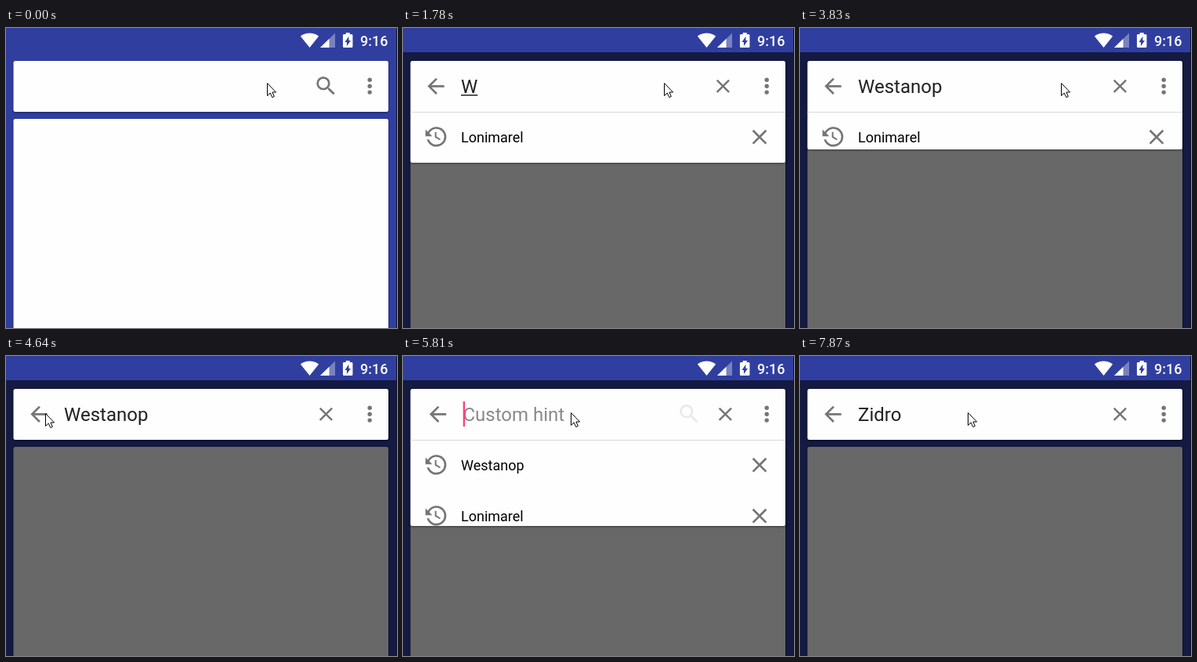
These frames come from a looping animation (499x383 px, 8000 ms). An HTML page:

```html
<!DOCTYPE html>
<html lang="en">
<head>
<meta charset="utf-8">
<title>Floating search bar</title>
<style>
  html, body { margin: 0; width: 100%; height: 100%; overflow: hidden; background: #303f9f; }
  svg { display: block; font-family: Roboto, "Liberation Sans", sans-serif; }
  .shadow { filter: drop-shadow(0 1px 1.5px rgba(0, 0, 0, .45)); }
  .icon { fill: #757575; }
  .query { font-size: 24px; fill: #212121; }
  .hint { font-size: 24px; fill: #8a8a8a; }
  .row { font-size: 18px; }
  .clock { font-size: 18px; font-weight: 500; fill: #fff; }
</style>
</head>
<body>
<svg width="499" height="383" viewBox="0 0 499 383">
  <defs>
    <path id="arrow" d="M20 11H7.83l5.59-5.59L12 4l-8 8 8 8 1.41-1.41L7.83 13H20z"/>
    <path id="cross" d="M19 6.41 17.59 5 12 10.59 6.41 5 5 6.41 10.59 12 5 17.59 6.41 19 12 13.41 17.59 19 19 17.59 13.41 12z"/>
    <path id="lens" d="M15.5 14h-.79l-.28-.27A6.47 6.47 0 0 0 16 9.5 6.5 6.5 0 1 0 9.5 16c1.61 0 3.09-.59 4.23-1.57l.27.28v.79l5 4.99L20.49 19zm-6 0a4.5 4.5 0 1 1 0-9 4.5 4.5 0 0 1 0 9z"/>
    <path id="history" d="M11 7v5.11l4.71 2.79.79-1.28-4-2.37V7M12.5 2C8.97 2 5.91 3.92 4.27 6.77L2 4.5V11h6.5L5.75 8.25C6.96 5.73 9.5 4 12.5 4a7.5 7.5 0 0 1 0 15c-3.27 0-6.03-2.09-7.06-5h-2.1c1.1 4.03 4.77 7 9.16 7a9.5 9.5 0 0 0 0-19z"/>
    <clipPath id="listClip"><rect id="listBox" x="9" y="107" width="479" height="0"/></clipPath>
  </defs>

  <rect width="499" height="383" fill="#303f9f"/>
  <rect class="shadow" x="9.5" y="116" width="478.5" height="290" rx="2.5" fill="#fefefe"/>
  <rect id="dim" y="31" width="499" height="352" opacity="0"/>

  <g fill="#fff">
    <path transform="translate(375.5 3.5)" d="M12 21.5 23.64 7C23.19 6.66 18.71 3 12 3S.81 6.66.36 7z"/>
    <path d="M401 25H420V6.5z" opacity=".35"/>
    <path d="M401 25H412.5V13.8z"/>
    <path transform="translate(421.2 4.1) scale(1.25 .95)" d="M15.67 4H14V2h-4v2H8.33C7.6 4 7 4.6 7 5.33v15.33C7 21.4 7.6 22 8.33 22h7.33c.74 0 1.34-.6 1.34-1.33V5.33C17 4.6 16.4 4 15.67 4zM11 20v-5.5H9L13 7v5.5h2z"/>
  </g>
  <text class="clock" x="452" y="22.5">9:16</text>

  <rect id="panel" class="shadow" x="9.5" y="42" width="478.5" height="65" rx="2.5" fill="#fefefe"/>
  <g id="list" clip-path="url(#listClip)">
    <rect x="9.5" y="107" width="478.5" height="1" fill="#dcdcdc"/>
  </g>

  <g class="icon">
    <use id="back" href="#arrow"/>
    <use id="search" href="#lens"/>
    <use id="clear" href="#cross"/>
    <circle cx="464.2" cy="66.3" r="2.7"/>
    <circle cx="464.2" cy="74.2" r="2.7"/>
    <circle cx="464.2" cy="82.1" r="2.7"/>
  </g>
  <text id="hint" class="hint" y="83">Custom hint</text>
  <text id="query" class="query" y="83"></text>
  <rect id="underline" y="85" height="1.5" fill="#212121"/>
  <rect id="caret" y="58" width="2.4" height="32" fill="#ff4081"/>

  <path id="mouse" d="M.5.5V16.5L4.2 13 6.8 18.6 9.4 17.4 6.9 12H11.6z" fill="#fff" stroke="#000"/>
  <rect x="498" width="1" height="383" fill="#10142e"/>
</svg>

<script>
const LOOP = 8000, ROW = 65, TEXT_X = 74, ICON = 4 / 3;
const $ = id => document.getElementById(id);
const ui = Object.fromEntries(
  ['dim', 'panel', 'list', 'listBox', 'back', 'search', 'clear', 'hint', 'query', 'underline', 'caret', 'mouse']
    .map(id => [id, $(id)]));

// start, end, number of steps
const bursts = [
  [280, 510, 5], [3160, 3960, 14], [4240, 4640, 9], [4920, 5270, 8],
  [5610, 5810, 5], [5810, 5870, 2], [7460, 7870, 9]
];

// time, text, underlined, caret visible
const typing = [
  [0, '', 0, 0], [440, '', 0, 1], [1000, '', 0, 0],
  [1250, 'W', 0, 1], [1310, 'W', 1, 1], [1780, 'W', 1, 0],
  [1940, 'We', 0, 1], [2000, 'We', 1, 1], [2125, 'Wes', 1, 1],
  [2250, 'Wesa', 0, 1], [2310, 'Wesa', 1, 1], [2530, 'Wesa', 0, 1],
  [2800, 'Wes', 1, 1], [2905, 'West', 1, 1], [3010, 'Westa', 1, 1],
  [3160, 'Westan', 1, 1], [3320, 'Westano', 1, 1], [3500, 'Westanop', 1, 1],
  [3640, 'Westanop', 0, 0], [5260, '', 0, 0],
  [5750, '', 0, 1], [6320, '', 0, 0],
  [6650, 'Z', 0, 1], [6770, 'Z', 1, 1], [7080, 'Zi', 1, 1], [7310, 'Zid', 1, 1],
  [7460, 'Zidr', 1, 1], [7510, 'Zidro', 1, 1], [7610, 'Zidro', 0, 0]
];

const clamp = v => Math.min(1, Math.max(0, v));
const linear = (t, a, b) => clamp((t - a) / (b - a));
const ramp = (t, a, b) => .5 - .5 * Math.cos(Math.PI * linear(t, a, b));
const set = (el, attrs) => { for (const k in attrs) el.setAttribute(k, attrs[k]); };
const place = (x, y, s = ICON) => `translate(${x} ${y}) scale(${s}) translate(-12 -12)`;

function hold(t) {
  const burst = bursts.find(([a, b]) => t >= a && t < b);
  if (!burst) return t;
  const [a, b, n] = burst, step = (b - a) / (n - 1);
  return a + Math.floor((t - a) / step + 1e-6) * step;
}

function addRow(i) {
  const y = 139.5 + i * ROW;
  ui.list.insertAdjacentHTML('beforeend',
    `<use class="icon" href="#history" transform="${place(42, y)}"/>
     <text class="row" x="${TEXT_X}" y="${y + 6.5}"></text>
     <use class="icon" href="#cross" transform="${place(455, y - .3)}"/>`);
}
addRow(0);
addRow(1);
const rowTexts = ui.list.querySelectorAll('text');

function mouseAt(t) {
  if (t < 4920) {
    const p = ramp(t, 4190, 4640), q = 1 - p;
    return [333 * q + 50 * p, 70 * q * q + 106 * q * p + 72.5 * p * p];
  }
  return [50 + 164 * ramp(t, 4950, 5270), 72.3];
}

function draw(now) {
  const time = now % LOOP, t = hold(time);
  const second = t >= 5400;
  const open = second ? ramp(t, 5590, 5886) : ramp(t, 240, 510) * (1 - ramp(t, 4890, 5200));
  const folded = second ? ramp(t, 7630, 7870) : ramp(t, 3680, 3960);
  const names = second ? ['Westanop', 'Lonimarel'] : ['Lonimarel', ''];
  const height = (second ? 2 : 1) * ROW * open * (1 - folded);
  const shown = clamp(open * 1.2), away = 1 - open;

  set(ui.dim, { opacity: .59 * shown });
  set(ui.panel, { height: 65 + height });
  set(ui.listBox, { height });
  rowTexts.forEach((el, i) => { el.textContent = names[i]; });

  set(ui.back, { transform: place(42 + 16 * away, 74.3), opacity: shown });
  set(ui.clear, { transform: place(408.4 + 19 * away, 74.3, 1.22), opacity: shown });
  set(ui.search, { transform: place(408.3 - 51 * open, 74), opacity: away });

  const [, text, lined, caret] = typing.findLast(k => k[0] <= t);
  const x = TEXT_X + 16 * away;
  ui.query.textContent = text;
  const width = text ? ui.query.getComputedTextLength() : 0;
  set(ui.query, { x, opacity: shown });
  set(ui.hint, { x, opacity: text ? 0 : shown });
  set(ui.underline, { x, width, opacity: lined });
  set(ui.caret, { x: x + width + .2, opacity: caret });

  const [mx, my] = mouseAt(t).map(Math.round);
  set(ui.mouse, { transform: `translate(${mx} ${my})` });
}

const start = performance.now();
function tick() {
  draw(performance.now() - start);
  requestAnimationFrame(tick);
}
tick();
</script>
</body>
</html>
```
